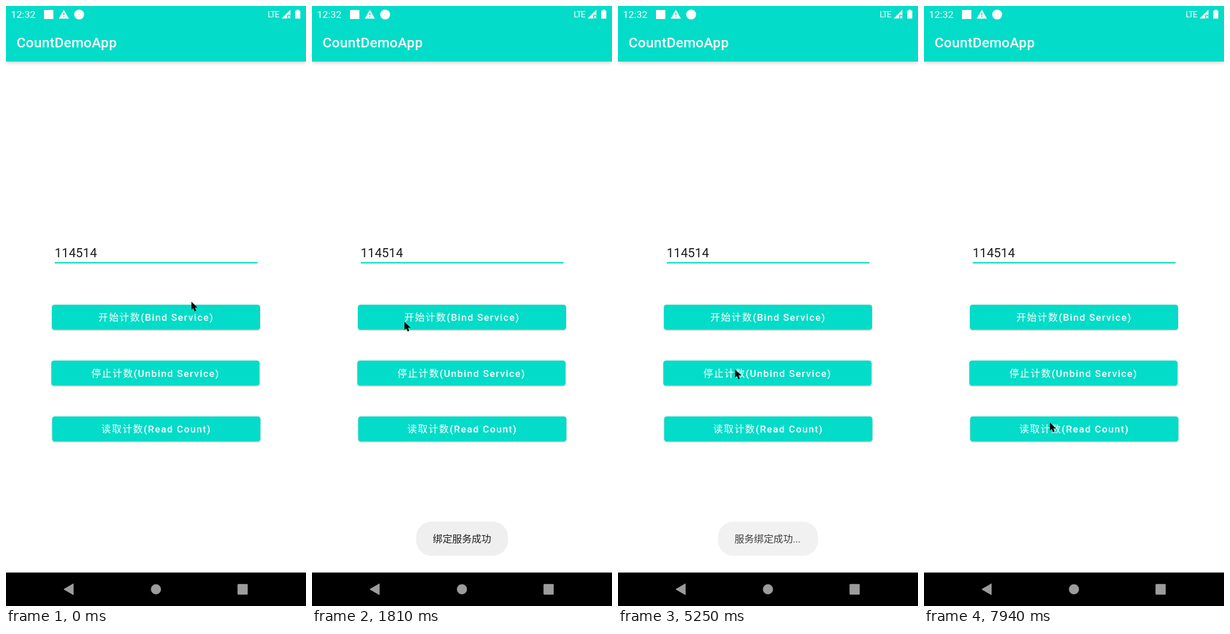
An HTML page for the animation above (8 s loop, 529 by 1058 pixels).

```html
<!DOCTYPE html>
<html lang="zh-CN">
<head>
<meta charset="utf-8">
<title>Counter service</title>
<style>
  html, body { margin: 0; width: 100%; height: 100%; overflow: hidden; background: #fff; }
  svg { display: block; width: 100vw; height: 100vh; }
  text { font-family: Roboto, "Noto Sans CJK SC", "Noto Sans CJK", sans-serif; white-space: pre; }
  .teal { fill: #03dcc8; }
  .bar { filter: drop-shadow(0 2px 3px rgba(0, 0, 0, .2)); }
  .title { font-size: 24.5px; font-weight: 500; letter-spacing: .3px; }
  .label { font-size: 17.14px; font-weight: 500; letter-spacing: 1.53px; fill: #fff; text-anchor: middle; }
  .label .zh { font-weight: 400; }
  .toast rect { fill: #efefef; }
  .toast text { font-size: 17.14px; fill: #1e1e1e; }
</style>
</head>
<body>
<svg id="stage" viewBox="0 0 529 1058" preserveAspectRatio="none">
  <rect width="529" height="1058" fill="#fff"/>
  <rect class="teal bar" width="529" height="98"/>

  <!-- status bar -->
  <g fill="#fff">
    <text x="8.8" y="21" font-size="17.4">12:32</text>
    <rect x="67" y="7" width="16.5" height="16"/>
    <path d="M102 6.5 L111 22.2 H93 Z"/>
    <path class="teal" d="M101.2 12h1.7v4.6h-1.7z M101.2 18.2h1.7v1.8h-1.7z"/>
    <circle cx="129" cy="15" r="8.8"/>
    <text x="461.5" y="20.3" font-size="14.8" letter-spacing="-1.1">LTE</text>
    <path d="M486 22 L501.5 6.5 V15.5 H495.5 V22 Z"/>
    <path d="M497 17 l4.6 4.8 M501.6 17 l-4.6 4.8" stroke="#fff" stroke-width="1.3"/>
    <path d="M512.6 6.5h4v1.7h2.4v14h-9v-14h2.6z"/>
    <text class="title" x="18.8" y="73">CountDemoApp</text>
  </g>

  <!-- number field -->
  <text x="85.8" y="443" font-size="22.1" fill="#1c1c1c">114514</text>
  <rect class="teal" x="86" y="451.6" width="357.5" height="2.4"/>
  <rect class="teal" id="caret" x="159.3" y="419" width="2.5" height="30"/>

  <g id="buttons"></g>
  <g id="toasts"></g>

  <!-- navigation bar -->
  <rect y="999" width="529" height="59"/>
  <g fill="#9c9c9c" stroke="#9c9c9c" stroke-linejoin="round">
    <path d="M102 1028.5 L118.8 1018.8 V1038.2 Z"/>
    <circle cx="264.4" cy="1028.5" r="8.5"/>
    <rect x="408.8" y="1019.8" width="17" height="17.6" rx=".5"/>
  </g>

  <path id="mouse" d="M0 0 V14.2 L3.2 11.3 L5.7 17 L8.4 15.8 L5.9 10.3 H10.6 Z"/>
</svg>
<script>
const LOOP = 8000, TICK = 62.5, W = 367, H = 44;
const NS = 'http://www.w3.org/2000/svg';
const byId = id => document.getElementById(id);

function add(parent, tag, attrs = {}, text) {
  const el = document.createElementNS(NS, tag);
  for (const k in attrs) el.setAttribute(k, attrs[k]);
  if (text) el.textContent = text;
  return parent.appendChild(el);
}

const clamp = p => Math.min(1, Math.max(0, p));
const part = (t, start, length) => clamp((t - start) / length);
const mix = (a, b, p) => a + (b - a) * p;
const smooth = p => p * p * (3 - 2 * p);

// cubic-bezier(.4, 0, .2, 1)
function fastOut(p) {
  let lo = 0, hi = 1, s = .5;
  for (let i = 0; i < 20; i++) {
    s = (lo + hi) / 2;
    const x = 1.2 * s * (1 - s) ** 2 + .6 * s * s * (1 - s) + s ** 3;
    if (x < p) lo = s; else hi = s;
  }
  return 3 * s * s * (1 - s) + s ** 3;
}

// press: start, release of the shadow, touch point
const buttons = [
  { x: 81, y: 526.7, zh: '开始计数', en: '(Bind Service)', press: { at: 935, up: 1200, x: 163, y: 555 } },
  { x: 80, y: 625.2, zh: '停止计数', en: '(Unbind Service)', press: { at: 6355, up: 6600, x: 218, y: 641 } },
  { x: 81.5, y: 723.8, zh: '读取计数', en: '(Read Count)' }
];

buttons.forEach((b, i) => {
  const g = byId('buttons');
  const box = { x: b.x, y: b.y, width: W, height: H, rx: 4.5 };
  b.cx = b.x + W / 2;
  b.cy = b.y + H / 2;
  b.face = add(g, 'rect', { ...box, class: 'teal' });
  add(add(g, 'clipPath', { id: 'clip' + i }), 'rect', box);
  const clip = add(g, 'g', { 'clip-path': `url(#clip${i})` });
  b.ripple = add(clip, 'circle', { fill: '#fff', opacity: 0 });
  const label = add(g, 'text', { class: 'label', x: b.cx, y: b.cy + 6.4 });
  add(label, 'tspan', { class: 'zh' }, b.zh);
  add(label, 'tspan', {}, b.en);
});

const toasts = [
  { x: 183.7, w: 162, text: '绑定服务成功', from: 1300, to: 2960 },
  { x: 176.2, w: 176.8, text: '服务绑定成功...', from: 3110, to: 5060 }
];

for (const t of toasts) {
  t.el = add(byId('toasts'), 'g', { class: 'toast' });
  add(t.el, 'rect', { x: t.x, y: 909.3, width: t.w, height: 60.2, rx: 27 });
  add(t.el, 'text', { x: t.x + 29.4, y: 946.3 }, t.text);
}

// time, x, y of the pointer tip
const track = [
  [0, 327, 521.5], [812, 163, 555], [1500, 163, 555], [1625, 163, 557],
  [2440, 163, 557], [3250, 56, 690.5], [3300, 56, 690.5], [4062, 188, 650],
  [4100, 188, 650], [4312, 193, 644], [4690, 193, 644], [4875, 199, 643],
  [5125, 199, 643], [5250, 206.5, 641], [5500, 217.8, 641],
  [7440, 217.8, 641], [7937, 222, 734.5], [LOOP, 222, 734.5]
];

function pointer(t) {
  const i = track.findIndex(k => k[0] > t);
  const a = track[i - 1], b = track[i];
  const p = smooth(part(t, a[0], b[0] - a[0]));
  return [mix(a[1], b[1], p), mix(a[2], b[2], p)];
}

function drawButton(b, t) {
  const p = b.press;
  const lift = p ? part(t, p.at, 100) * (1 - part(t, p.up, 100)) : 0;
  b.face.style.filter =
    `drop-shadow(0 ${mix(1.4, 5, lift)}px ${mix(1.3, 4.5, lift)}px rgba(0,0,0,${mix(.3, .27, lift)}))`;
  if (!p) return;
  const grow = fastOut(part(t, p.at, 225));
  b.ripple.setAttribute('cx', mix(p.x, b.cx, grow));
  b.ripple.setAttribute('cy', mix(p.y, b.cy, grow));
  b.ripple.setAttribute('r', mix(W * .3, Math.hypot(W, H) / 2, grow));
  b.ripple.setAttribute('opacity', .25 * part(t, p.at, 75) * (1 - part(t, p.at + 225, 150)));
}

// the screen refreshes 16 times a second
function snap(t) {
  let k = Math.floor((t + 3) / TICK);
  if (Math.round(k * TICK / 10) * 10 > t) k--;
  return Math.min(k * TICK, LOOP - TICK);
}

function draw(now) {
  const t = snap(now % LOOP);
  byId('caret').style.opacity = (t - 312.5 + LOOP) % 1000 < 500 ? 1 : 0;
  for (const b of buttons) drawButton(b, t);
  for (const o of toasts)
    o.el.style.opacity = (1 - (1 - part(t, o.from, 500)) ** 2) * (1 - part(t, o.to, 500) ** 2);
  byId('mouse').setAttribute('transform', `translate(${pointer(t)})`);
}

const begin = performance.now();
function loop() {
  draw(performance.now() - begin);
  requestAnimationFrame(loop);
}
loop();
</script>
</body>
</html>
```
